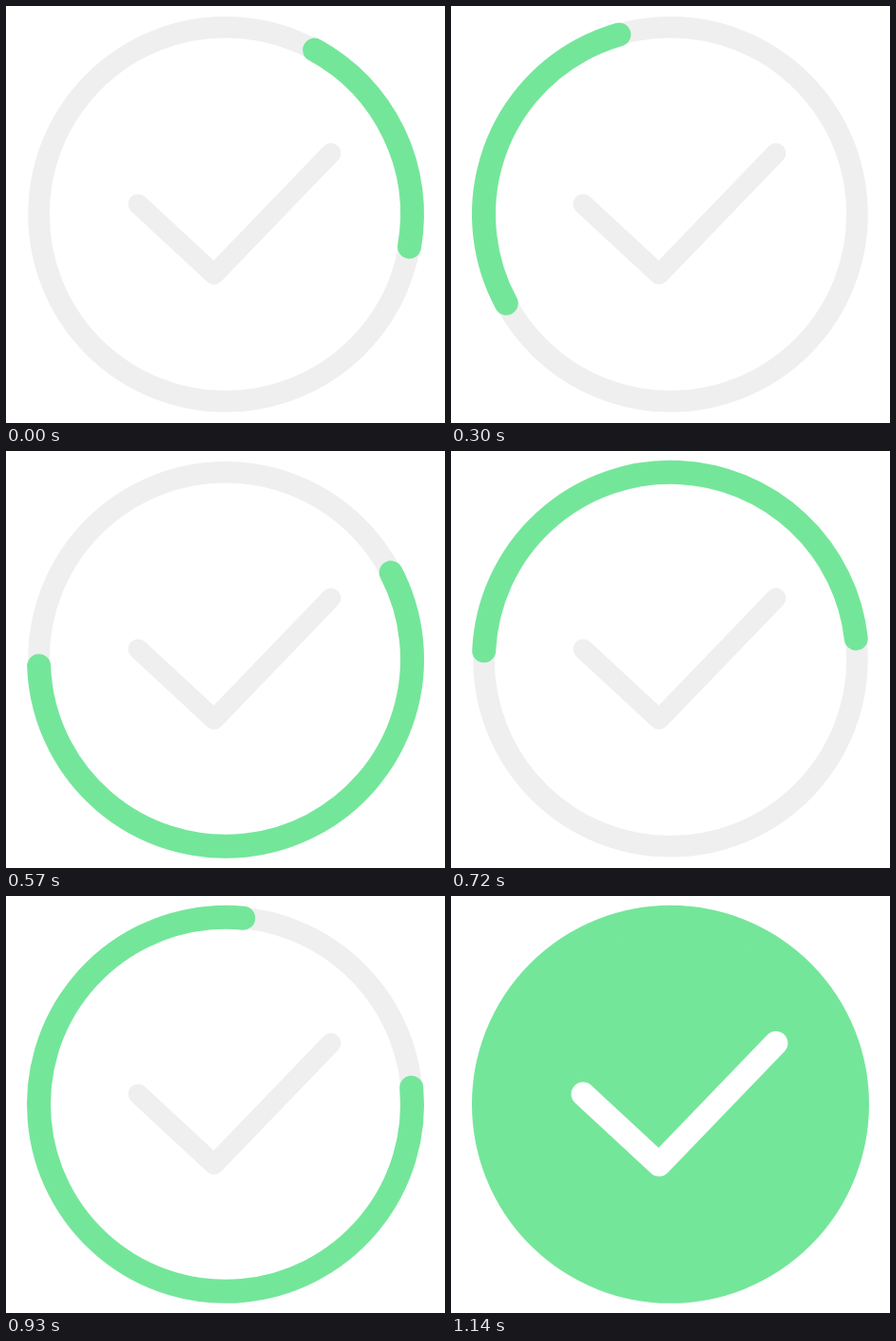
These frames come from a looping animation (462x438 px, 2700 ms). An HTML page with a canvas:

```html
<!DOCTYPE html>
<html lang="en">
<head>
<meta charset="utf-8">
<title>Loader to check mark</title>
<style>
  html, body { margin: 0; width: 100%; height: 100%; overflow: hidden; background: #fff; }
  canvas { display: block; }
</style>
</head>
<body>
<canvas id="stage" width="462" height="438"></canvas>
<script>
const ctx = document.getElementById('stage').getContext('2d');
const LOOP = 2700, STEP = 30, DONE = 1140;
const CX = 231, CY = 218.8, R = 196.5;
const GREEN = '#74e69a', GREY = '#efefef';
const CHECK = [[139, 208], [219, 282], [342, 154.5]];

// Leading end of the arc: [ms, degrees]
const HEAD = [[0, 10], [300, 254], [570, 538], [720, 713.6], [930, 995.5], [1020, 1119], [1140, 1285]];

const clamp = x => Math.min(1, Math.max(0, x));
const progress = (t, from, to) => clamp((t - from) / (to - from));
const settle = t => t > 0 ? 1 - Math.exp(-t / 110) : 0;

// Cubic interpolation through the points
function spline(points, t) {
  const last = points.length - 1;
  const slope = i => {
    const a = points[Math.max(0, i - 1)], b = points[Math.min(last, i + 1)];
    return (b[1] - a[1]) / (b[0] - a[0]);
  };
  let i = 0;
  while (i < last - 1 && t >= points[i + 1][0]) i++;
  const [t0, v0] = points[i], [t1, v1] = points[i + 1];
  const d = t1 - t0, u = (t - t0) / d, w = 1 - u;
  return w * w * (1 + 2 * u) * v0 + u * u * (3 - 2 * u) * v1
    + d * u * w * (w * slope(i) - u * slope(i + 1));
}

// Steady turn with a quick catch-up that eases out
const tailAngle = t => -61.5 + t * 2 / 3 + 14 * settle(t) + 148 * settle(t - 570);

function arc(from, to, color, width) {
  ctx.beginPath();
  ctx.arc(CX, CY, R, from * Math.PI / 180, to * Math.PI / 180);
  ctx.strokeStyle = color;
  ctx.lineWidth = width;
  ctx.stroke();
}

function disc(radius) {
  ctx.beginPath();
  ctx.arc(CX, CY, radius, 0, 2 * Math.PI);
  ctx.fillStyle = GREEN;
  ctx.fill();
}

function check(part, color, width, alpha) {
  if (part <= 0 || alpha <= 0) return;
  const [a, b, c] = CHECK;
  const len = (p, q) => Math.hypot(q[0] - p[0], q[1] - p[1]);
  const total = len(a, b) + len(b, c);
  ctx.beginPath();
  ctx.moveTo(...a);
  ctx.lineTo(...b);
  ctx.lineTo(...c);
  ctx.setLineDash([total * part, total * 2]);
  ctx.globalAlpha = alpha;
  ctx.strokeStyle = color;
  ctx.lineWidth = width;
  ctx.stroke();
  ctx.globalAlpha = 1;
  ctx.setLineDash([]);
}

function draw(t) {
  ctx.fillStyle = '#fff';
  ctx.fillRect(0, 0, 462, 438);
  ctx.lineCap = ctx.lineJoin = 'round';

  arc(0, 360, GREY, 22.5);
  check(1, GREY, 21, 1 - progress(t, 930, 990));

  const grow = progress(t, 952, DONE);
  if (grow > 0) disc(187 * grow * (2 - grow));

  const tail = tailAngle(t), head = spline(HEAD, t);
  if (head - tail < 360) arc(tail, head, GREEN, 25);
  else arc(0, 360, GREEN, 25);

  check(progress(t, 960, 1110), '#fff', 25, progress(t, 960, 1075));
}

function tick(now) {
  const t = now % LOOP;
  draw(Math.min(DONE, Math.floor(t / STEP) * STEP));
  requestAnimationFrame(tick);
}
draw(0);
requestAnimationFrame(tick);
</script>
</body>
</html>
```
